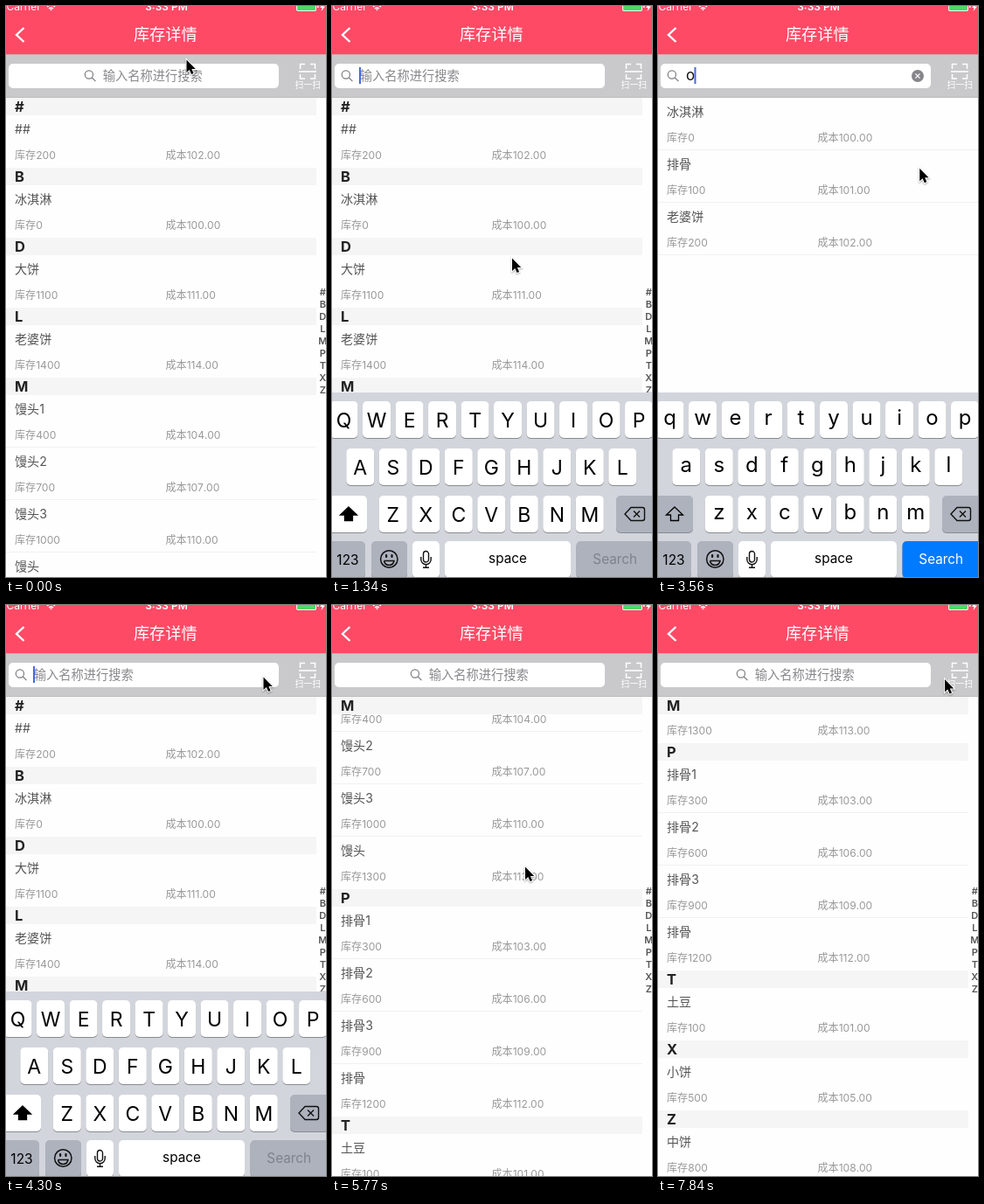
An HTML page with a canvas that plays this animation: 366x653 px, repeating every 7.99 s.

```html
<!DOCTYPE html>
<html lang="zh-CN">
<head>
<meta charset="utf-8">
<title>库存详情</title>
<style>
html, body { margin: 0; width: 100%; height: 100%; overflow: hidden; background: #fff; }
canvas { display: block; width: 366px; height: 653px; }
</style>
</head>
<body>
<canvas></canvas>
<script>
const W = 366, H = 653, LOOP = 7990, BEATS = 54;
const LIST_TOP = 105, ROW = 60, HEAD = 20, KEYBOARD_TOP = 442, KEYBOARD_HEIGHT = H - KEYBOARD_TOP;
const canvas = document.querySelector('canvas');
const ctx = canvas.getContext('2d');
const ratio = window.devicePixelRatio || 1;
canvas.width = W * ratio;
canvas.height = H * ratio;

// Unit cost follows from the stock: 100 + stock / 100.
const sections = [
  ['#', ['##', 200]],
  ['B', ['冰淇淋', 0]],
  ['D', ['大饼', 1100]],
  ['L', ['老婆饼', 1400]],
  ['M', ['馒头1', 400], ['馒头2', 700], ['馒头3', 1000], ['馒头', 1300]],
  ['P', ['排骨1', 300], ['排骨2', 600], ['排骨3', 900], ['排骨', 1200]],
  ['T', ['土豆', 100]],
  ['X', ['小饼', 500]],
  ['Z', ['中饼', 800]]
];
const results = [['冰淇淋', 0], ['排骨', 100], ['老婆饼', 200]];

// What the user does, in beats.
const FOCUS = 6, TYPE = 17, CLEAR = 26, DRAG = 33, FLICK = 39;
const pointerHome = { x: 206, y: 61 };
const pointerMoves = [
  { from: 0, to: 1, x: 198, y: 76 },
  { from: FOCUS, to: 9, x: 205.5, y: 288 },
  { from: 9, to: TYPE - 1, x: 312.5, y: 480 },
  { from: 20, to: CLEAR, x: 294, y: 82 },
  { from: 30, to: DRAG, x: 247, y: 318 },
  { from: DRAG, to: 34, x: 246.5, y: 209 },
  { from: 34, to: FLICK, x: 220.5, y: 299 },
  { from: FLICK, to: 41, x: 219, y: 88 },
  { from: 41, to: 46, x: 217, y: 442 },
  { from: 46, to: 50, x: 217.5, y: 194 },
  { from: 51, to: 53, x: 327.5, y: 84.5 }
];

const progress = (beat, from, to) => Math.min(Math.max((beat - from) / (to - from), 0), 1);

const easeOut = (beat, from, to, power) => 1 - (1 - progress(beat, from, to)) ** power;

function easeInOut(beat, from, to) {
  const p = progress(beat, from, to);
  return p * p * (3 - 2 * p);
}

function pointerAt(beat) {
  let { x, y } = pointerHome;
  for (const move of pointerMoves) {
    const p = easeInOut(beat, move.from, move.to);
    x += (move.x - x) * p;
    y += (move.y - y) * p;
  }
  return [x, y];
}

// Each flick coasts to a stop; the second ends at the bottom of the list.
const scrollAt = beat =>
  360 * easeOut(beat, DRAG, FLICK, 2.15) + 167 * easeOut(beat, FLICK, FLICK + 5, 2.15);

const keyboardShown = beat =>
  easeOut(beat, FOCUS - .5, FOCUS + 2.5, 1.5) - easeOut(beat, DRAG, DRAG + 3, 1.5);

const placeholderCentering = beat =>
  1 - easeInOut(beat, FOCUS - .5, FOCUS + 2.5) + easeInOut(beat, DRAG, DRAG + 3);

function rect(x, y, w, h, color) {
  ctx.fillStyle = color;
  ctx.fillRect(x, y, w, h);
}

function box(x, y, w, h, r, color) {
  ctx.beginPath();
  ctx.roundRect(x, y, w, h, r);
  ctx.fillStyle = color;
  ctx.fill();
}

// y is the vertical middle of the capitals or ideographs.
function text(str, x, y, size, color, align = 'left', weight = 400) {
  ctx.font = `${weight} ${size}px Inter, "Noto Sans CJK SC", "Noto Sans CJK", sans-serif`;
  ctx.textAlign = align;
  ctx.fillStyle = color;
  ctx.fillText(str, x, y + size * .37);
}

function stroke(path, color, width) {
  ctx.strokeStyle = color;
  ctx.lineWidth = width;
  ctx.stroke(new Path2D(path));
}

function fill(path, color) {
  ctx.fillStyle = color;
  ctx.fill(new Path2D(path));
}

function drawRow([name, stock], y, lineWidth) {
  text(name, 10, y + 16, 14.1, '#555');
  text('库存' + stock, 10, y + 46, 12.1, '#999');
  text('成本' + (100 + stock / 100).toFixed(2), 182.5, y + 46, 12.1, '#999');
  rect(0, y + ROW - 1, lineWidth, 1, '#f1f1f1');
}

function drawSections(scroll) {
  let top = LIST_TOP - scroll;
  for (const [letter, ...rows] of sections) {
    const bottom = top + HEAD + rows.length * ROW;
    rows.forEach((row, i) =>
      drawRow(row, top + HEAD + i * ROW, i < rows.length - 1 ? 355 : 0));
    const headY = Math.min(Math.max(top, LIST_TOP), bottom - HEAD);
    rect(0, headY, 355, HEAD, '#f5f5f5');
    text(letter, 10, headY + 10, 16.5, '#222', 'left', 700);
    top = bottom;
  }
  sections.forEach(([letter], i) =>
    text(letter, 362.3, 327 + i * 14, 11, '#555', 'center', 600));
}

function drawNavigation() {
  rect(0, 0, W, 55.3, '#ff4a66');
  text('Carrier', 0.5, 0.8, 12, '#fff');
  stroke('M47 1 Q51.5 -3 56 1 M49 3 Q51.5 .8 54 3', '#fff', 1.4);
  fill('M50 3.5 L51.5 5.5 L53 3.5Z', '#fff');
  text('3:33 PM', 183.5, 0.8, 12, '#fff', 'center', 600);
  box(332, -5, 23, 11, 2, '#fff');
  box(333, -4, 21, 9, 1, '#4cd964');
  rect(356, -1, 1.5, 3, '#fff');
  fill('M363 -3 L359 2 H361.5 L360.5 6 L365 .5 H362.5Z', '#fff');
  stroke('M20.5 25 L12 33 L20.5 41', '#fff', 2.4);
  text('库存详情', 182.3, 32.5, 18.2, '#fff', 'center');
}

function drawSearchBar(centering, focused, query) {
  rect(0, 55, W, 50, '#c9c9cb');
  rect(0, 104, W, 1, '#bcbcbf');
  box(3, 66, 309, 28, 5, '#fff');
  const shift = centering * 79;
  ctx.save();
  ctx.translate(shift, 0);
  stroke('M20.5 78.5 a4.6 4.6 0 1 1 -9.2 0 a4.6 4.6 0 1 1 9.2 0 M19.3 82 L23.5 86.2', '#7d7d82', 1.2);
  ctx.restore();
  if (query) {
    text(query, 32, 79, 17, '#111');
    box(290, 73, 14, 14, 7, '#85858a');
    stroke('M294.4 77.4 L299.6 82.6 M299.6 77.4 L294.4 82.6', '#fff', 1.3);
  } else {
    text('输入名称进行搜索', 31.7 + shift, 80, 14.25, '#88888c');
  }
  if (focused) rect(query ? 41.5 : 31, 70, 2, 19, '#4469e3');
  stroke('M336.5 72 V66.5 H342 M348 66.5 H353.5 V72 M353.5 78 V83 H348 M342 83 H336.5 V78 M335 75 H355', '#fff', 1.5);
  text('扫一扫', 345.3, 90.3, 9.8, '#fff', 'center');
}

function drawKey(x, y, w, color) {
  box(x, y + 1, w, 42, 5, '#898b90');
  box(x, y, w, 42, 5, color);
}

function drawKeyboard(offset, lower) {
  const gray = '#adb2bd', white = '#fff', ink = '#000', pitch = 37.5;
  ctx.save();
  ctx.translate(0, offset);
  rect(0, KEYBOARD_TOP, W, KEYBOARD_HEIGHT, '#d2d5dc');
  ['QWERTYUIOP', 'ASDFGHJKL', 'ZXCVBNM'].forEach((letters, row) => {
    const y = KEYBOARD_TOP + 10 + row * 54;
    const firstX = 182.3 - (letters.length - 1) * pitch / 2;
    [...letters].forEach((letter, i) => {
      const x = firstX + i * pitch;
      drawKey(x - 16, y, 32, white);
      if (lower) text(letter.toLowerCase(), x, y + 18.5, 24, ink, 'center');
      else text(letter, x, y + 21.5, 23, ink, 'center');
    });
  });

  drawKey(-6, 560, 46, lower ? gray : white);
  const arrow = 'M19 573 L28.5 582 H23.5 V588.5 H14.5 V582 H9.5Z';
  if (!lower) fill(arrow, ink);
  stroke(arrow, ink, 1.3);
  drawKey(325, 560, 46, gray);
  stroke('M342 573.5 H355 Q357.5 573.5 357.5 576 V586 Q357.5 588.5 355 588.5 H342 L335 581Z M345 577.5 L352 584.5 M352 577.5 L345 584.5', '#111', 1.4);

  drawKey(-6, 612, 44, gray);
  text('123', 18, 633.5, 15.5, ink, 'center');
  drawKey(45, 612, 41, gray);
  stroke('M75 632.5 a9.7 9.7 0 1 1 -19.4 0 a9.7 9.7 0 1 1 19.4 0 M59.5 634.5 H71 Q70 639.5 65.3 639.5 Q60.5 639.5 59.5 634.5', '#111', 1.5);
  box(61, 627, 2.2, 4, 1, '#111');
  box(67.4, 627, 2.2, 4, 1, '#111');
  drawKey(92, 612, 31, white);
  stroke('M104.5 626.5 a3 3 0 0 1 6 0 V633 a3 3 0 0 1 -6 0Z M101.8 630 V633 a5.7 5.7 0 0 0 11.4 0 V630 M107.5 639 V642 M104 642.3 H111', '#111', 1.4);
  drawKey(129, 612, 144, white);
  text('space', 201, 631.5, 15.3, ink, 'center');
  drawKey(279.5, 612, 92, lower ? '#007aff' : gray);
  text('Search', 323.7, 632.5, 15.3, lower ? white : '#7d828d', 'center');
  ctx.restore();
}

function drawPointer(x, y) {
  const arrow = 'M.5 .5 V15 L3.8 12 L6.1 17 L8.6 15.9 L6.4 11.1 H10.8Z';
  ctx.save();
  ctx.translate(x, y);
  ctx.shadowColor = 'rgba(0,0,0,.35)';
  ctx.shadowBlur = 2 * ratio;
  ctx.shadowOffsetY = ratio;
  stroke(arrow, '#fff', 2);
  ctx.shadowColor = 'transparent';
  fill(arrow, '#000');
  ctx.restore();
}

function draw(beat) {
  const query = beat >= TYPE && beat < CLEAR ? 'o' : '';
  const focused = beat >= FOCUS && beat <= DRAG;
  const shown = keyboardShown(beat);
  ctx.setTransform(ratio, 0, 0, ratio, 0, 0);
  rect(0, 0, W, H, '#fefefe');
  if (query) results.forEach((row, i) => drawRow(row, LIST_TOP + i * ROW, W));
  else drawSections(scrollAt(beat));
  drawSearchBar(placeholderCentering(beat), focused, query);
  drawNavigation();
  if (shown > 0) drawKeyboard((1 - shown) * KEYBOARD_HEIGHT, query !== '');
  drawPointer(...pointerAt(beat));
}

// The screen is refreshed in even steps; the small lead absorbs timer rounding.
function tick(now) {
  draw(Math.floor((now % LOOP + 10) * BEATS / LOOP) % BEATS);
  requestAnimationFrame(tick);
}
tick(0);
</script>
</body>
</html>
```
